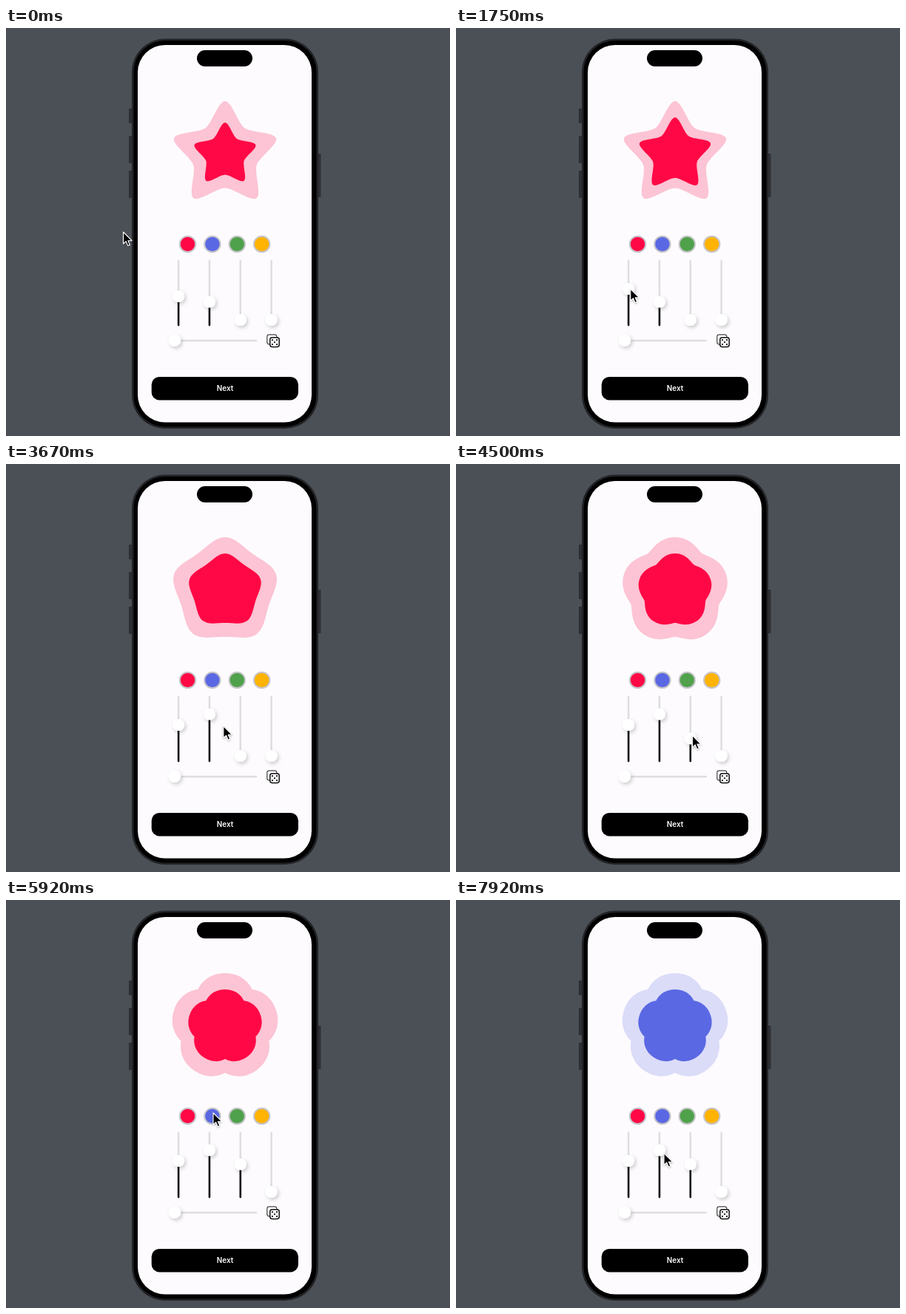
An HTML page that plays this animation: 600x552 px, repeating every 8 s.

```html
<!DOCTYPE html>
<html lang="en">
<head>
<meta charset="utf-8">
<title>Shape editor</title>
<style>
html, body { margin: 0; width: 100%; height: 100%; overflow: hidden; background: #4b5057; }
svg { display: block; width: 600px; height: 552px; }
text { font: 600 9.9px Inter, sans-serif; fill: #fff; text-anchor: middle; }
</style>
</head>
<body>
<svg viewBox="0 0 600 552">
  <defs>
    <filter id="soft" x="-100%" y="-100%" width="300%" height="300%">
      <feDropShadow dx="2" dy="2.5" stdDeviation="2.8" flood-color="#000" flood-opacity=".2"/>
    </filter>
    <filter id="lift" x="-50%" y="-50%" width="200%" height="200%">
      <feDropShadow dx="0" dy="1" stdDeviation=".8" flood-color="#000" flood-opacity=".35"/>
    </filter>
  </defs>
  <rect width="600" height="552" fill="#4b5057"/>

  <g fill="#2d2f33">
    <rect x="166" y="109" width="5" height="20" rx="1"/>
    <rect x="166" y="146" width="5" height="37" rx="1"/>
    <rect x="166" y="193" width="5" height="37" rx="1"/>
    <rect x="421" y="170" width="4.5" height="59" rx="1"/>
  </g>
  <rect x="170" y="14.5" width="252" height="527.5" rx="45" fill="#222326"/>
  <rect x="172.5" y="17" width="247" height="522.5" rx="42.5" fill="#000"/>
  <rect x="178" y="23" width="235" height="510.5" rx="37" fill="#fdfbfe"/>
  <rect x="258" y="30" width="75" height="22" rx="11"/>

  <path id="outer"/>
  <path id="inner"/>
  <g id="swatches"></g>
  <g id="sliders"></g>

  <path d="M228 423H338" stroke="#dedde1" stroke-width="2.5" stroke-linecap="round"/>
  <circle cx="228" cy="422.7" r="8.2" fill="#fff" filter="url(#soft)"/>

  <g fill="#fdfbfe" stroke="#111">
    <rect x="352.8" y="414.8" width="13" height="13" rx="2.8" stroke="#444" stroke-width="1.2"/>
    <rect x="356.8" y="418.8" width="12.4" height="12.6" rx="2.8" stroke-width="1.5"/>
  </g>
  <g id="pips" fill="#111"></g>

  <rect x="196.7" y="472" width="198.3" height="31.4" rx="10.5"/>
  <text x="296" y="491.3">Next</text>

  <path id="cursor" d="M0 0V16L3.7 12.6L6.3 18.6L8.9 17.5L6.4 11.7H11.6Z"
        fill="#000" stroke="#fff" stroke-width="1.1" stroke-linejoin="round" filter="url(#lift)"/>
</svg>
<script>
const LOOP = 8000, STEP = 1000 / 12, PAUSE = 150;
const CX = 296, CY = 171.5, RADIUS = 72.5;
const BOTTOM = 402, REST = 395, SPAN = 73;
const $ = id => document.getElementById(id);
const sliderX = i => 233.1 + 41.85 * i;

function add(parent, tag, attrs) {
  const el = document.createElementNS('http://www.w3.org/2000/svg', tag);
  for (const k in attrs) el.setAttribute(k, attrs[k]);
  return parent.appendChild(el);
}

['#ff0845', '#5a68e3', '#50a14b', '#ffb302'].forEach((fill, i) =>
  add($('swatches'), 'circle', { cx: 245.5 + i * 33.4, cy: 292.4, r: 10.7, fill, stroke: '#c6c5ca', 'stroke-width': 2 }));

for (let i = 0; i < 9; i += 2)
  add($('pips'), 'circle', { cx: 360 + i % 3 * 3, cy: 422.1 + Math.floor(i / 3) * 3, r: 1.15 });

function makeSlider(i) {
  const x = sliderX(i), group = $('sliders');
  const line = stroke => add(group, 'path', { d: `M${x} 315V${BOTTOM}`, stroke, 'stroke-width': 2.5, 'stroke-linecap': 'round' });
  line('#dedde1');
  const bar = line('#000');
  const knob = add(group, 'circle', { cx: x, r: 8.1, fill: '#fff', filter: 'url(#soft)' });
  return y => {
    bar.setAttribute('d', `M${x} ${y}V${BOTTOM}`);
    bar.setAttribute('visibility', y < REST - 1 ? 'visible' : 'hidden');
    knob.setAttribute('cy', y);
  };
}
const sliders = [0, 1, 2, 3].map(makeSlider);

const ease = (t, start, end) => {
  const u = Math.min(1, Math.max(0, (t - start) / (end - start)));
  return u * u * (3 - 2 * u);
};
const lerp = (a, b, u) => a + (b - a) * u;

// The first three sliders are dragged in turn; grip is the pointer's offset from the knob.
const drags = [
  { start: 900, end: 1600, from: 363, to: 353, grip: 0 },
  { start: 2280, end: 3330, from: 370.5, to: 338.5, grip: -7 },
  { start: 4070, end: 4800, from: REST, to: 357.5, grip: -4 }
];
const knobY = ({ start, end, from, to }, t) => lerp(from, to, ease(t, start, end));

// The pointer rests at each stop and travels between them.
const stop = (arrive, leave, x, y) => ({ arrive, leave, at: () => [x, y] });
const stops = [
  stop(0, 60, 158.5, 276),
  ...drags.map((d, i) => ({
    arrive: d.start - PAUSE,
    leave: d.end + PAUSE,
    at: t => [sliderX(i) + 2.7, knobY(d, t) + d.grip]
  })),
  stop(5330, 5330, 285.5, 273.5),
  stop(5650, 6000, 280, 288),
  stop(6650, 6800, 273, 397),
  stop(7560, 7620, 354, 387),
  stop(7920, LOOP, 281, 342.5)
];

function pointer(t) {
  const i = stops.findLastIndex(s => s.arrive <= t);
  const here = stops[i], next = stops[i + 1];
  if (!next || t <= here.leave) return here.at(t);
  const u = ease(t, here.leave, next.arrive), goal = next.at(t);
  return here.at(t).map((v, k) => lerp(v, goal[k], u));
}

const polar = (r, a, side) => {
  const c = Math.cos(a), s = Math.sin(a);
  return (CX + r * c - side * s).toFixed(2) + ' ' + (CY + r * s + side * c).toFixed(2);
};

// Five tips and five valleys, joined by tangential handles.
function blob(radius, depth, puff) {
  const dip = radius * (.436 + .548 * depth);
  const tipArm = radius * (.08 + .13 * depth + .4 * puff);
  const dipArm = dip * .25 * (1 - puff / .514);
  let d = 'M' + polar(radius, -Math.PI / 2, 0);
  for (let i = 0; i < 5; i++) {
    const a = (i * .4 - .5) * Math.PI, v = a + .2 * Math.PI, n = a + .4 * Math.PI;
    d += `C${polar(radius, a, tipArm)} ${polar(dip, v, -dipArm)} ${polar(dip, v, 0)}`;
    d += `C${polar(dip, v, dipArm)} ${polar(radius, n, -tipArm)} ${polar(radius, n, 0)}`;
  }
  return d + 'Z';
}

const mix = (a, b, u) => `rgb(${a.map((v, i) => Math.round(lerp(v, b[i], u)))})`;

function draw(t) {
  const ys = [...drags.map(d => knobY(d, t)), REST];
  ys.forEach((y, i) => sliders[i](y));
  const [, depth, puff] = ys.map(y => (REST - y) / SPAN);
  const size = 43.5 + .7 * (363 - ys[0]);
  const blue = ease(t, 5920, 6170);

  $('outer').setAttribute('d', blob(RADIUS, depth, puff));
  $('outer').setAttribute('fill', mix([252, 196, 212], [219, 220, 248], blue));
  $('inner').setAttribute('d', blob(size, depth, puff));
  $('inner').setAttribute('fill', mix([255, 8, 69], [90, 104, 227], blue));
  $('cursor').setAttribute('transform', `translate(${pointer(t)})`);
}

function frame(now) {
  draw(Math.floor((now % LOOP + 5) / STEP) * STEP % LOOP);
  requestAnimationFrame(frame);
}
draw(0);
requestAnimationFrame(frame);
</script>
</body>
</html>
```
